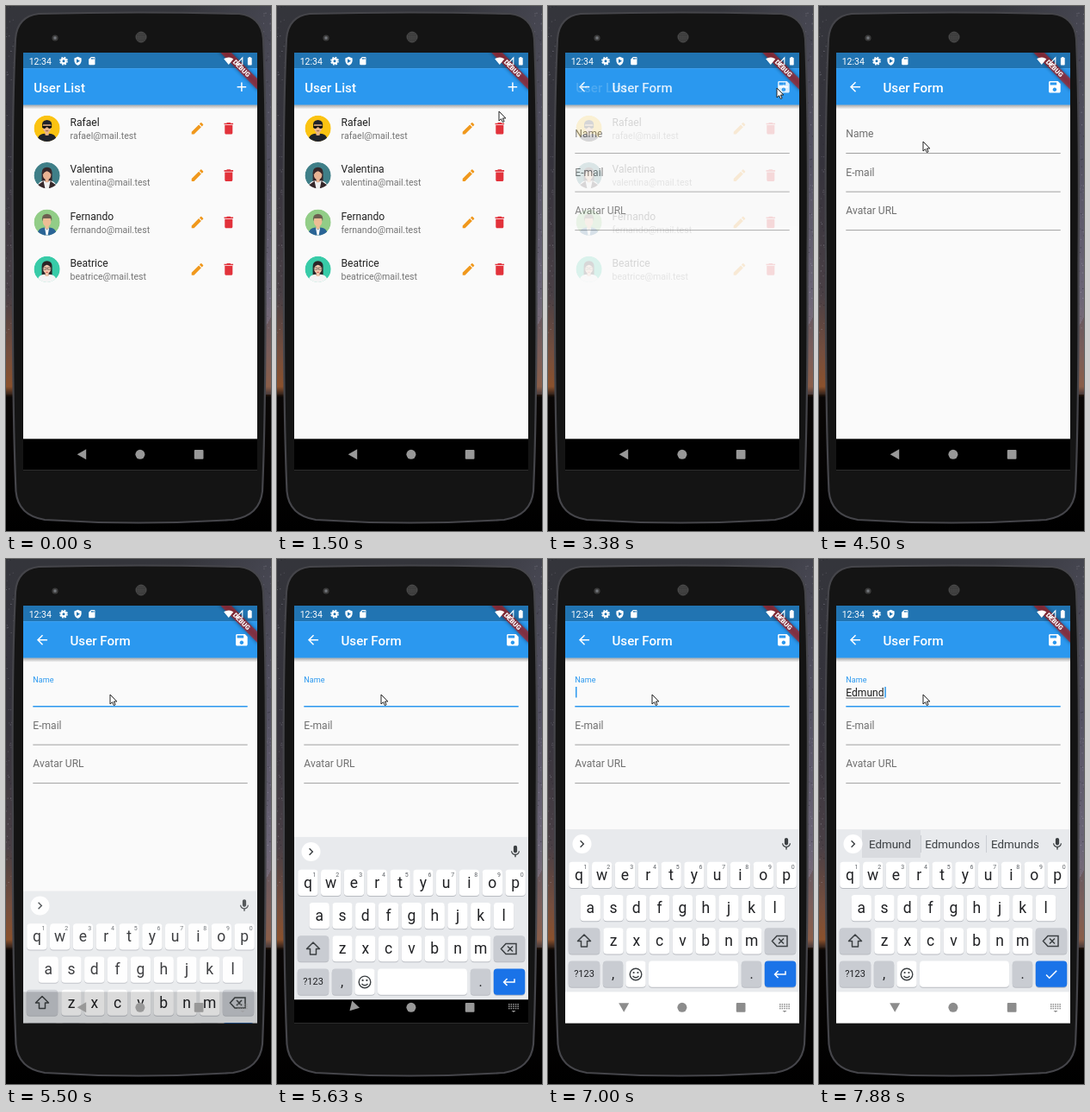
Animation of 308 by 608 pixels, one loop 8 s. Source, as an HTML page:

```html
<!DOCTYPE html>
<html lang="en">
<head>
<meta charset="utf-8">
<title>User form demo</title>
<style>
html, body { margin: 0; width: 100%; height: 100%; overflow: hidden; background: #000; }
svg { display: block; font-family: Roboto, sans-serif; }
</style>
</head>
<body>
<svg id="stage" width="308" height="608" viewBox="0 0 308 608"></svg>
<script>
const LOOP = 8000, STEP = 125;
const BLUE = '#2b98ef', GREY = '#707070';
const TYPED = 'Edmund';

const ICON = {
  add: 'M19 13h-6v6h-2v-6H5v-2h6V5h2v6h6v2z',
  edit: 'M3 17.25V21h3.75L17.81 9.94l-3.75-3.75L3 17.25zM20.71 7.04c.39-.39.39-1.02 0-1.41l-2.34-2.34c-.39-.39-1.02-.39-1.41 0l-1.83 1.83 3.75 3.75 1.83-1.83z',
  trash: 'M6 19c0 1.1.9 2 2 2h8c1.1 0 2-.9 2-2V7H6v12zM19 4h-3.5l-1-1h-5l-1 1H5v2h14V4z',
  save: 'M17 3H5c-1.11 0-2 .9-2 2v14c0 1.1.89 2 2 2h14c1.1 0 2-.9 2-2V7l-4-4zm-5 16c-1.66 0-3-1.34-3-3s1.34-3 3-3 3 1.34 3 3-1.34 3-3 3zm3-10H5V5h10v4z',
  back: 'M20 11H7.83l5.59-5.59L12 4l-8 8 8 8 1.41-1.41L7.83 13H20v-2z',
  shield: 'M12 1L3 5v6c0 5.55 3.84 10.74 9 12 5.16-1.26 9-6.45 9-12V5l-9-4z',
  card: 'M18 2h-8L4 8v12c0 1.1.9 2 2 2h12c1.1 0 2-.9 2-2V4c0-1.1-.9-2-2-2zm-6 6h-2V4h2v4zm3 0h-2V4h2v4zm3 0h-2V4h2v4z',
  wifi: 'M12 21L23.64 7C23.19 6.66 18.71 3 12 3S.81 6.66.36 7L12 21z',
  battery: 'M15.67 4H14V2h-4v2H8.33C7.6 4 7 4.6 7 5.33v15.33C7 21.4 7.6 22 8.33 22h7.33c.74 0 1.34-.6 1.34-1.33V5.33C17 4.6 16.4 4 15.67 4z',
  mic: 'M12 14c1.66 0 3-1.34 3-3V5c0-1.66-1.34-3-3-3S9 3.34 9 5v6c0 1.66 1.34 3 3 3zm5.3-3c0 3-2.54 5.1-5.3 5.1S6.7 14 6.7 11H5c0 3.41 2.72 6.23 6 6.72V21h2v-3.28c3.28-.48 6-3.3 6-6.72h-1.7z',
  more: 'M10 6L8.59 7.41 13.17 12l-4.58 4.59L10 18l6-6z',
  check: 'M9 16.17L4.83 12l-1.42 1.41L9 19 21 7l-1.41-1.41z',
  enter: 'M19 7v4H5.83l3.58-3.59L8 6l-6 6 6 6 1.41-1.41L5.83 13H21V7z'
};

const rect = (x, y, w, h, fill, more = '') =>
  `<rect x="${x}" y="${y}" width="${w}" height="${h}" fill="${fill}" ${more}/>`;
const disc = (x, y, r, fill, more = '') =>
  `<circle cx="${x}" cy="${y}" r="${r}" fill="${fill}" ${more}/>`;
const path = (d, fill, more = '') => `<path d="${d}" fill="${fill}" ${more}/>`;
const text = (x, y, size, str, fill, more = '') =>
  `<text x="${x}" y="${y}" font-size="${size}" fill="${fill}" ${more}>${str}</text>`;
const icon = (name, x, y, size, fill, more = '') =>
  path(ICON[name], fill, `transform="translate(${x - size / 2} ${y - size / 2}) scale(${size / 24})" ${more}`);
const line = (d, color, width, more = '') =>
  path(d, 'none', `stroke="${color}" stroke-width="${width}" ${more}`);
// A full-width band of the phone's screen
const band = (y, h, fill, more) => rect(20, y, 272, h, fill, more);
const MID = 'text-anchor="middle"', BOLD = 'font-weight="500"';

let seed = 7;
const random = () => (seed = seed * 16807 % 2147483647) / 2147483647;

function backdrop() {
  let s = rect(0, 0, 308, 608, 'url(#sky)') + rect(0, 0, 308, 450, 'url(#haze)');
  for (let i = 0; i < 200; i++) {
    const x = i % 2 ? random() * 10 : 298 + random() * 10;
    s += disc(x.toFixed(1), (random() * 380).toFixed(1), .6, i % 3 ? '#aaa8b4' : '#1c1b22',
      `opacity="${(.15 + random() * .4).toFixed(2)}"`);
  }
  return s;
}

function phone() {
  const body = 'M38 9Q154 6 271 9Q297 12 299 38Q303 130 301.500 300Q302 470 298 562Q295 590 264 595Q154 602 45 595Q14 590 11.500 562Q7.500 470 8 300Q6.500 130 11 38Q13 12 38 9z';
  let mesh = '';
  for (let i = 0; i < 25; i++)
    mesh += disc(152.8 + i % 5 * 2.1, 31.8 + (i / 5 | 0) * 2.1, .6, '#222');
  return path(body, '#141414', 'stroke="#45454a" stroke-width="2.2"') +
    disc(57, 37, 3.6, '#3c3c3c') + disc(57, 37, 1.7, '#73777c') +
    disc(157, 36, 6.5, '#4a4a4a') + mesh;
}

function statusBar() {
  return text(26.7, 67.8, 10.5, '12:34', '#fff') +
    disc(67, 63.7, 2.6, 'none', 'stroke="#fff" stroke-width="2.2"') +
    disc(67, 63.7, 4.2, 'none', 'stroke="#fff" stroke-width="1.4" stroke-dasharray="1.900 1.400"') +
    icon('shield', 83.5, 63.7, 11, '#fff') + path('M82 61.3l4 2.4-4 2.4z', '#2174b2') +
    icon('card', 99.8, 63.7, 11, '#fff') + icon('wifi', 258.8, 63.7, 11.5, '#fff') +
    line('M267.500 67.700H274.800V60z', '#fff', 1.1) + icon('battery', 283.3, 63.7, 11.5, '#fff');
}

const banner = `<g transform="translate(292 54) rotate(45)">
  ${rect(-32, 21.2, 64, 9, '#000', 'opacity=".45" filter="url(#soft)"')}
  ${rect(-32, 21.2, 64, 9, '#b71c1c', 'opacity=".65"')}
  ${text(0, 28.4, 7.7, 'DEBUG', '#fff', MID + ' font-weight="900"')}</g>`;

const people = [
  ['Rafael', '#fbc312', '#20232b', '#20232b', '#e9b48a'],
  ['Valentina', '#3f7f88', '#35272a', '#f0f0f0', '#e8b393'],
  ['Fernando', '#92cd87', '#6d5f50', '#2a6496', '#edbd95'],
  ['Beatrice', '#38cba8', '#2a2527', '#f4f4f4', '#f3c8ad']
];

function avatar(i, [, back, hair, top, skin], y) {
  const long = i % 2;
  let s = disc(0, 0, 15.1, back);
  if (long) s += path('M-6 8V-3Q-6-9.500 0-9.500T6-3V8z', hair);
  s += path('M-10.5 16V11Q-9 6.500-3 6L0 8 3 6Q9 6.500 10.500 11V16z', top) +
    rect(-2, 3, 4, 5, skin) +
    `<ellipse cy="-1" rx="4.8" ry="6" fill="${skin}"/>` +
    path(long ? 'M-5 0Q-5-8.500 1-8.500 5-8 5 0 4-4 0-5-4-4-5 0z' : 'M-5.400-1Q-7-9.500 0-9.800 7-9.500 5.400-1L4.500-4.500H-4.500z', hair);
  if (i == 0) s += path('M-5.500-3H5.500V-1Q3 1.500.500-1.500H-.500Q-3 1.500-5.500-1z', '#111') + rect(-1.5, 2.5, 3, .8, '#7a4a38');
  if (i == 1) s += path('M-10.500 16V11L-4 6.500-2 16zM10.500 16V11L4 6.500 2 16z', hair);
  if (i == 2) s += path('M-2.500 6.500L0 9 2.500 6.500 1 15H-1z', '#fff');
  if (i == 3) s += line('M-4.500-2h3.800v2.400h-3.800zM.700-2h3.800v2.400H.700z', '#444', .6) + rect(-1.2, 3, 2.4, .8, '#c33');
  return `<g transform="translate(47.6 ${y})" clip-path="url(#round)">${s}</g>`;
}

function listPage() {
  return text(32.2, 99.6, 15.11, 'User List', '#fff', BOLD) + icon('add', 273.9, 93.7, 18.1, '#fff') +
    people.map((p, i) => {
      const y = 141.8 + i * 54.35;
      return avatar(i, p, y) + text(74.5, y - 2.9, 12.09, p[0], '#212121') +
        text(74.5, y + 12.2, 10.58, p[0].toLowerCase() + '@mail.test', '#757575') +
        icon('edit', 222.5, y, 18.1, '#f0981c') + icon('trash', 258.8, y, 18.1, '#e2323b');
    }).join('');
}

const appBar = () => band(54, 18.1, '#2174b2') + band(72.1, 42.5, BLUE) + band(114.6, 5, 'url(#shade)');

function formPage() {
  const field = (y, name, id = '') => text(31.3, y, 12.09, name, GREY, id);
  const rule = (y, id = '') => rect(31.3, y, 249.4, .8, '#8a8a8a', id);
  return band(54, 448, '#fafafa') + appBar() +
    icon('back', 42, 93.7, 18.1, '#fff') + text(74.5, 99.6, 15.11, 'User Form', '#fff', BOLD) +
    icon('save', 273.9, 93.7, 18.1, '#fff') +
    field(152, 'Name', 'id="label"') + field(196.7, 'E-mail') + field(241.2, 'Avatar URL') +
    rule(170, 'id="rule"') + rule(214.7) + rule(259.3) +
    text(31.3, 159, 12.09, '', '#1c1c1c', 'id="input"') +
    rect(31.3, 160.6, 0, .8, '#333', 'id="compose"') + rect(32, 148, 1.5, 12.5, BLUE, 'id="caret"');
}

function key(x, y, w, label = '', fill = '#fff', size = 17.5) {
  return rect(x - w / 2, y - 14.5, w, 30.5, '#b9bcc2', 'rx="4"') +
    rect(x - w / 2, y - 15.2, w, 30.2, fill, 'rx="4"') +
    text(x, y + size * .33, size, label, '#202124', MID);
}

function keyboard() {
  const dark = '#c9ccd2', ink = '#3c4043';
  const row = (letters, x, y) => [...letters].map((c, i) => key(x + i * 26.8, y, 23.4, c)).join('');
  let s = band(313, 188.3, '#e8eaed');
  s += row('qwertyuiop', 35.9, 366) + row('asdfghjkl', 49.2, 404.3) + row('zxcvbnm', 76, 442.4);
  for (let i = 0; i < 10; i++) s += text(43.5 + i * 26.8, 359, 7, (i + 1) % 10, '#5f6368', MID);
  s += key(42, 442.4, 36.5, '', dark) + key(270, 442.4, 36.5, '', dark) +
    key(42, 480.8, 36.5, '?123', dark, 11) + key(75.5, 480.8, 23.4, ',', dark, 16) +
    key(102, 480.8, 23.4) + key(169, 480.8, 104) + key(236.5, 480.8, 23.4, '.', dark, 16) +
    key(270, 480.8, 36.5, '', '#1a73e8');
  s += line('M42 435l-7.500 7.500h4V449h7v-6.500h4z', ink, 1.5, 'stroke-linejoin="round"') +
    line('M266 436.500h12v12h-12l-5.500-6zM268 439.500l6 6m0-6l-6 6', ink, 1.5) +
    disc(102, 481, 6.8, 'none', `stroke="${ink}" stroke-width="1.4"`) +
    disc(99.6, 479, 1.1, ink) + disc(104.4, 479, 1.1, ink) + line('M98.500 483q3.500 3.500 7 0', ink, 1.4) +
    icon('enter', 270, 481, 18, '#fff', 'id="enter"') + icon('check', 270, 481, 18, '#fff', 'id="check"');
  s += rect(50, 314, 68, 32, '#d9dbdf', 'id="pick"') +
    disc(39.5, 330, 11, '#fff') + icon('more', 39.5, 330, 17, ink) + icon('mic', 277, 330, 17, ink) +
    `<g id="hints">${[82.5, 155, 228].map(x => text(x, 335, 13.4, '', ink, MID)).join('')}
      ${rect(118, 320, .8, 20, '#c4c7cc')}${rect(194, 320, .8, 20, '#c4c7cc')}</g>`;
  return s;
}

function navIcons() {
  let dots = '';
  for (let i = 0; i < 15; i++)
    dots += `<rect x="${269 + i % 5 * 2.6}" y="${515 + (i / 5 | 0) * 2.4}" width="1.5" height="1.5"/>`;
  return `<g id="nav"><path id="back" d="M-5.500 0L5-6V6z"/><circle cx="155.900" cy="519.300" r="5.500"/>
    <rect x="218.800" y="514" width="10.700" height="10.700" rx="1"/>
    <g id="dots">${dots}<path d="M272.500 523h5l-2.500 2z"/></g></g>`;
}

stage.innerHTML = `<defs>
  <linearGradient id="sky" x2="0" y2="1">
    <stop stop-color="#34353b"/><stop offset=".3" stop-color="#35333c"/><stop offset=".55" stop-color="#4a4046"/>
    <stop offset=".66" stop-color="#744c3a"/><stop offset=".725" stop-color="#8a4c22"/>
    <stop offset=".745" stop-color="#0a0706"/><stop offset="1"/>
  </linearGradient>
  <linearGradient id="haze" y2=".8">
    <stop offset=".4" stop-color="#8a88a4" stop-opacity="0"/><stop offset="1" stop-color="#8a88a4" stop-opacity=".55"/>
    <stop offset="1" stop-color="#8a88a4" stop-opacity=".3"/>
  </linearGradient>
  <linearGradient id="shade" x2="0" y2="1"><stop stop-opacity=".32"/><stop offset="1" stop-opacity="0"/></linearGradient>
  <clipPath id="screen">${band(54, 483.6, '#000')}</clipPath>
  <clipPath id="bar">${band(54, 60.6, '#000')}</clipPath>
  <clipPath id="round">${disc(0, 0, 15.1, '#000')}</clipPath>
  <filter id="soft" x="-20%" y="-100%" width="140%" height="300%"><feGaussianBlur stdDeviation="2"/></filter>
</defs>
${backdrop()}${phone()}
<g clip-path="url(#screen)">
  ${band(54, 483.6, '#fafafa')}${appBar()}${listPage()}
  <g clip-path="url(#bar)">${disc(273.9, 93.7, 0, '#fff', 'id="ripple"')}</g>
  <g id="form">${formPage()}</g>
  ${banner}${statusBar()}
  ${band(501.3, 37, '#000', 'id="navBg"')}
  <g id="board">${keyboard()}</g>${navIcons()}
</g>
<path id="cursor" d="M0 0V11L2.600 8.700 4.300 12.500 6.100 11.700 4.400 8H7.800z" fill="#fff" stroke="#222" stroke-linejoin="round"/>`;

const el = id => document.getElementById(id);
const set = (id, attrs) => { for (const a in attrs) el(id).setAttribute(a, attrs[a]); };
const clamp = v => Math.min(1, Math.max(0, v));

// Linear interpolation through [time, ...values] points
function track(t, pts) {
  const i = pts.findIndex(p => p[0] > t);
  if (i < 0) return pts.at(-1).slice(1);
  if (i == 0) return pts[0].slice(1);
  const [a, b] = [pts[i - 1], pts[i]], k = (t - a[0]) / (b[0] - a[0]);
  return a.slice(1).map((v, j) => v + (b[j + 1] - v) * k);
}

const pointer = [
  [875, 300, 510], [1125, 283, 330], [1375, 263, 160], [1500, 258, 122], [1625, 258, 110],
  [1875, 263, 80], [2000, 275, 70], [2125, 284, 79], [2250, 277, 90], [2500, 266, 95],
  [3625, 266, 95], [3875, 226, 106], [4125, 172, 132], [4375, 127, 154], [4500, 121, 157]
];

function draw(t) {
  const [x, y] = track(t, pointer);
  set('cursor', { transform: `translate(${x} ${y})`, opacity: t < 875 ? 0 : 1 });

  const [r, glow] = track(t, [[2625, 6, 0], [2750, 14, .25], [3000, 26, .15], [3250, 26, 0]]);
  set('ripple', { r, opacity: glow });
  set('form', { opacity: clamp((t - 3125) / 300) });

  const focus = clamp((t - 4800) / 250), on = focus > 0;
  set('label', { y: 152 - 9 * focus, 'font-size': 12.09 - 3.02 * focus, fill: on ? BLUE : GREY });
  set('rule', { fill: on ? BLUE : '#8a8a8a', height: on ? 1.5 : .8 });

  const rise = clamp((t - 5400) / 350);
  set('board', { transform: `translate(0 ${196 * (1 - rise) ** 3})`, opacity: clamp(rise * 3) });
  set('dots', { opacity: clamp(rise * 2) });
  set('back', { transform: `translate(88.2 519.3) rotate(${-90 * clamp((t - 5500) / 240)})` });

  const [bg] = track(t, [[6375, 0], [6875, 255]]);
  const [tone] = track(t, [[6125, 152], [6375, 88], [6875, 140]]);
  set('navBg', { fill: `rgb(${bg},${bg},${bg})` });
  set('nav', { fill: `rgb(${tone},${tone},${tone})` });

  const n = Math.min(TYPED.length, Math.max(0, Math.floor((t - 7000) / STEP)));
  const word = TYPED.slice(0, n);
  el('input').textContent = word;
  const width = n ? el('input').getComputedTextLength() : 0;
  set('compose', { width });
  const blink = Math.floor((t - 4900) / 500) % 2 == 0;
  set('caret', { x: 32 + width, opacity: on && (n || blink) ? 1 : 0 });

  ['', 'os', 's'].forEach((end, i) => { el('hints').children[i].textContent = word + end; });
  set('hints', { opacity: n ? 1 : 0 });
  set('pick', { opacity: t >= 7875 ? 1 : 0 });
  set('enter', { opacity: n ? 0 : 1 });
  set('check', { opacity: n ? 1 : 0 });
}

const start = performance.now();
function tick() {
  const t = (performance.now() - start) % LOOP;
  draw(Math.floor(t / STEP) * STEP);
  requestAnimationFrame(tick);
}
tick();
</script>
</body>
</html>
```
